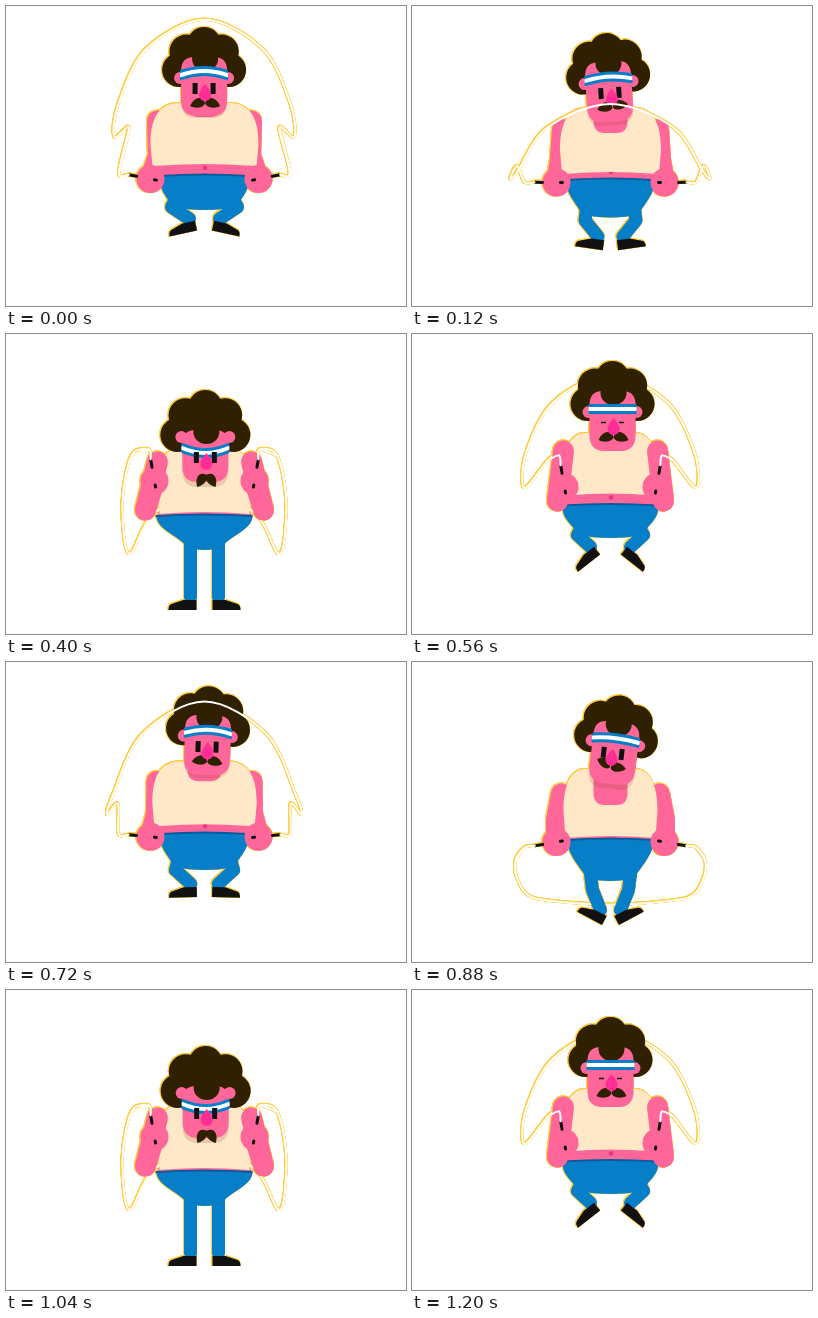
An HTML page with a canvas for the animation above (1.24 s loop, 400 by 300 pixels).

```html
<!DOCTYPE html>
<html lang="en">
<head>
<meta charset="utf-8">
<title>Jump rope</title>
<style>
  html, body { margin: 0; height: 100%; overflow: hidden; background: #fff; }
  canvas { display: block; width: 100vw; height: 100vh;
    filter: drop-shadow(.6px 0 0 #fc4) drop-shadow(-.6px 0 0 #fc4) drop-shadow(0 .5px 0 #fc4) drop-shadow(0 -.5px 0 #fc4); }
</style>
</head>
<body>
<canvas width="400" height="300"></canvas>
<script>
const ctx = document.querySelector('canvas').getContext('2d');
const LOOP = 1240, JUMP = 640, STEP = 40, AXIS = 198.5;
const SKIN = '#ff6699', CREAM = '#ffe8c8', BLUE = '#067fc8', HAIR = '#2e2000', BLACK = '#111', NOSE = '#ff2d95';
const { PI, sin, cos, max } = Math;
const smooth = u => u * u * (3 - 2 * u);
const easeOut = u => sin(u * PI / 2);

// A jump passes through four poses and returns to the first.
const POSES = [
  { name: 'rest', at: 0, ease: smooth },
  { name: 'fall', at: 240, ease: smooth },
  { name: 'stand', at: 400, ease: easeOut },
  { name: 'tuck', at: 560, ease: smooth }
];

function poseWeights(phase) {
  const weights = { rest: 0, fall: 0, stand: 0, tuck: 0 };
  const i = POSES.findLastIndex(pose => pose.at <= phase);
  const from = POSES[i], to = POSES[(i + 1) % POSES.length];
  const u = from.ease((phase - from.at) / ((to.at || JUMP) - from.at));
  weights[from.name] = 1 - u;
  weights[to.name] = u;
  return weights;
}

function fill(color, path) {
  ctx.fillStyle = color;
  ctx.fill(new Path2D(path));
}

function oval(color, x, y, rx, ry = rx) {
  ctx.fillStyle = color;
  ctx.beginPath();
  ctx.ellipse(x, y, rx, ry, 0, 0, 2 * PI);
  ctx.fill();
}

function stroke(color, width, path) {
  ctx.strokeStyle = color;
  ctx.lineWidth = width;
  ctx.lineCap = ctx.lineJoin = 'round';
  ctx.stroke(new Path2D(path));
}

function placed(x, y, degrees, draw) {
  ctx.save();
  ctx.translate(x, y);
  ctx.rotate(degrees * PI / 180);
  draw();
  ctx.restore();
}

function bothSides(draw) {
  for (const side of [1, -1]) {
    ctx.save();
    ctx.scale(side, 1);
    draw();
    ctx.restore();
  }
}

// Smooth path through all points.
function curve(points) {
  const p = i => points[max(0, Math.min(points.length - 1, i))];
  let path = `M${p(0)}`;
  for (let i = 0; i < points.length - 1; i++) {
    const c1 = [0, 1].map(k => p(i)[k] + (p(i + 1)[k] - p(i - 1)[k]) / 6);
    const c2 = [0, 1].map(k => p(i + 1)[k] - (p(i + 2)[k] - p(i)[k]) / 6);
    path += `C${c1} ${c2} ${p(i + 1)}`;
  }
  return path;
}

function drawHair({ fall, stand }) {
  const y = -5 + 3 * fall - 8 * stand, rx = 25 + 3 * stand, ry = 26 + 2 * stand;
  oval(HAIR, 0, y - 8, rx, ry - 4);
  for (let i = 0; i < 5; i++) {
    const angle = PI + i * PI / 4;
    oval(HAIR, rx * cos(angle), y + ry * sin(angle), 17);
  }
}

function drawFace({ fall, stand, tuck }, side, chin) {
  const look = -4 * stand, turn = 3 * fall * side;
  const strap = `M-23 0Q0 ${2 * (-4 + 2 * fall + 9 * stand + 4 * tuck)} 23 0`;
  ctx.save();
  ctx.clip(new Path2D('M-24 -30H24V30H-24Z'));
  stroke(BLUE, 10, strap);
  stroke('#fff', 4, strap);
  ctx.restore();

  placed(turn / 2, 13.5 + look, 0, () => {
    const eye = max(1.5, 11 * (1 - tuck));
    bothSides(() => fill(BLACK, `M6.5 ${-eye / 2}h5v${eye}h-5Z`));
  });
  placed(1 + turn, 27, -13 * fall * side, () => bothSides(() =>
    placed(-1, 0, 28 * fall - 40 * stand, () => fill(HAIR, 'M1 1C-2 -7 -10 -5 -14 4C-9 7 0 6 1 1Z'))));
  placed(1 + turn, 10 + look, 0, () => fill(NOSE, 'M0 -1Q6 6 6 10A6 6 0 0 1 -6 10Q-6 6 0 -1Z'));
}

function drawHead(pose, side, sway) {
  const { rest, fall, stand, tuck } = pose;
  const chin = 41 + 3 * fall - 7 * stand + tuck;
  const face = `M-23 -4Q-23 -18 -10 -18H10Q23 -18 23 -4V${chin - 16}Q23 ${chin} 8 ${chin}H-8Q-23 ${chin} -23 ${chin - 16}Z`;
  placed(1 + sway, 69 + 9 * fall + 45 * stand + 6 * tuck + 25, -7 * fall * side, () => {
    ctx.translate(0, -25);
    placed(0, 5 * (1 - tuck) - 3 * rest, 0, () => fill('rgba(150,70,50,.2)', face));
    drawHair(pose);
    bothSides(() => oval(SKIN, 24, 3 - 14 * stand, 6));
    fill(SKIN, face);
    oval(HAIR, 1, -16, 13, 12);
    drawFace(pose, side, chin);
  });
}

function drawLegs({ rest, fall, stand, tuck }, waist, wide) {
  const bend = rest + tuck;
  const hip = [-14 - 6 * fall - 14 * bend, 212 - 20 * bend];
  const knee = [-14 - 4 * fall - 19 * bend, 240 - 12 * fall - 39 * bend];
  const ankle = [-14 + 4 * fall - rest - 6 * tuck, 268 - 15 * fall - 50 * bend];
  bothSides(() => {
    stroke(BLUE, 13, `M${hip}L${knee}L${ankle[0]} ${ankle[1] - 5}`);
    placed(...ankle, 28 * fall - 12 * rest - 38 * tuck, () => fill(BLACK, 'M6 -2H-7L-19 2Q-22 3 -22 8H6Z'));
  });
  const seat = 34 - 8 * fall - 14 * stand, crotch = 204 + 15 * fall + 12 * stand;
  bothSides(() => fill(BLUE, `M-.5 ${waist}H${wide}C${wide + 1} ${waist + 15} ${seat + 4} ${crotch - 14} ${seat - 2} ${crotch - 3}
    Q${seat / 2} ${crotch} -.5 ${crotch}Z`));
}

function drawTorso({ rest, fall, stand, tuck }, waist, wide, top) {
  const half = 47 + 7 * rest, hem = waist - 1 - 8 * (rest + tuck), neck = top + 14 + 22 * fall;
  const belt = `${waist + 1}Q0 ${waist - 2} ${-wide} ${waist + 1}`;
  fill(SKIN, `M${3 - half} ${hem - 8}H${half - 3}Q${half} ${hem + 4} ${wide} ${belt}Q${-half} ${hem + 4} ${3 - half} ${hem - 8}Z`);
  stroke('#075b9b', 2, `M${wide - 1} ${belt}`);
  oval('#e8337f', .5, waist - 7, 2.2);
  bothSides(() => fill(CREAM, `M-.5 ${top}H24C${half - 6} ${top} ${half} ${top + 18} ${half} ${top + 42}L${half - 2} ${hem}Q20 ${hem - 2} -.5 ${hem - 2}Z`));
  fill(SKIN, `M-17 ${top - 4}H17V${neck - 12}Q17 ${neck} 6 ${neck}H-6Q-17 ${neck} -17 ${neck - 12}Z`);
}

function drawArms({ fall, stand, tuck }, top, hand) {
  const shoulder = [-47 - 2 * fall, top + 18 + 7 * fall - 4 * stand];
  const elbow = [-46 - 8 * fall - 13 * stand - 7 * tuck, 150 + 8 * fall + 26 * stand + 17 * tuck];
  bothSides(() => stroke(SKIN, 21, `M${shoulder}L${elbow}L${hand}`));
}

function ropePoints({ rest, fall, stand, tuck }, grip, swing) {
  const mix = (a, b, c, d) => a.map((v, k) => v * rest + b[k] * fall + c[k] * stand + d[k] * tuck);
  const curl = mix([-75, 122], [-92, 198], [-73, 122], [-62, 126]);
  const dip = mix([-90, 131], [-91, 215], [-82, 170], [-86, 154]);
  const arch = mix([-86, 98], [-80, 233], [-75, 220], [-84, 118]);
  for (const point of [curl, dip, arch]) point[0] -= 10 * max(0, sin(swing));
  const middle = 126 - 121 * cos(swing);
  const crown = [arch[0] * .68, middle + (arch[1] - middle) * .35];
  return [grip(0), grip(-10), curl, dip, arch, crown, [0, middle]];
}

function draw(time) {
  const phase = time % JUMP, turn = phase / JUMP;
  const side = time < JUMP ? 1 : -1;
  const sway = -1.6 * cos(PI * (time - 100) / JUMP);
  const pose = poseWeights(phase), { fall, stand, tuck } = pose;

  const waist = 169 + 8 * fall + 12 * stand + 1.5 * tuck;
  const wide = 45 - 2 * fall + 3 * stand + 3 * tuck;
  const top = 97 + 10 * fall + 17 * stand + 2 * tuck;
  const hand = [-54 + 4 * stand + 8 * tuck, 173 + 7 * fall - 26 * stand - 20 * tuck];
  const wrist = (11 - 21 * fall + 69 * (stand + tuck)) * PI / 180;
  const grip = along => [hand[0] + (along - 22) * cos(wrist), hand[1] + (along - 22) * sin(wrist)];

  const swing = (-22 + 360 * turn + 56 * sin(PI * turn)) * PI / 180;
  const half = ropePoints(pose, grip, swing);
  const mirrored = half.slice(0, -1).map(([x, y]) => [-x, y]).reverse();
  const drawRope = () => stroke('#fff', 2, curve([...half, ...mirrored]));
  const ropeInFront = sin(swing) > .4;
  const armsInFront = stand + tuck > .5;

  ctx.clearRect(0, 0, 400, 300);
  placed(AXIS, 0, 0, () => {
    if (!ropeInFront) drawRope();
    if (!armsInFront) drawArms(pose, top, hand);
    drawLegs(pose, waist, wide);
    drawTorso(pose, waist, wide, top);
    if (armsInFront) drawArms(pose, top, hand);
    drawHead(pose, side, sway);
    bothSides(() => {
      oval(SKIN, ...hand, 14);
      stroke(BLACK, 3, `M${grip(1)}L${grip(8)}M${grip(26)}L${grip(28)}`);
    });
    if (ropeInFront) drawRope();
    else bothSides(() => stroke('#fff', 2, curve(half.slice(0, 3))));
  });
}

function tick() {
  draw(Math.floor(performance.now() % LOOP / STEP) * STEP);
  requestAnimationFrame(tick);
}
tick();
</script>
</body>
</html>
```
